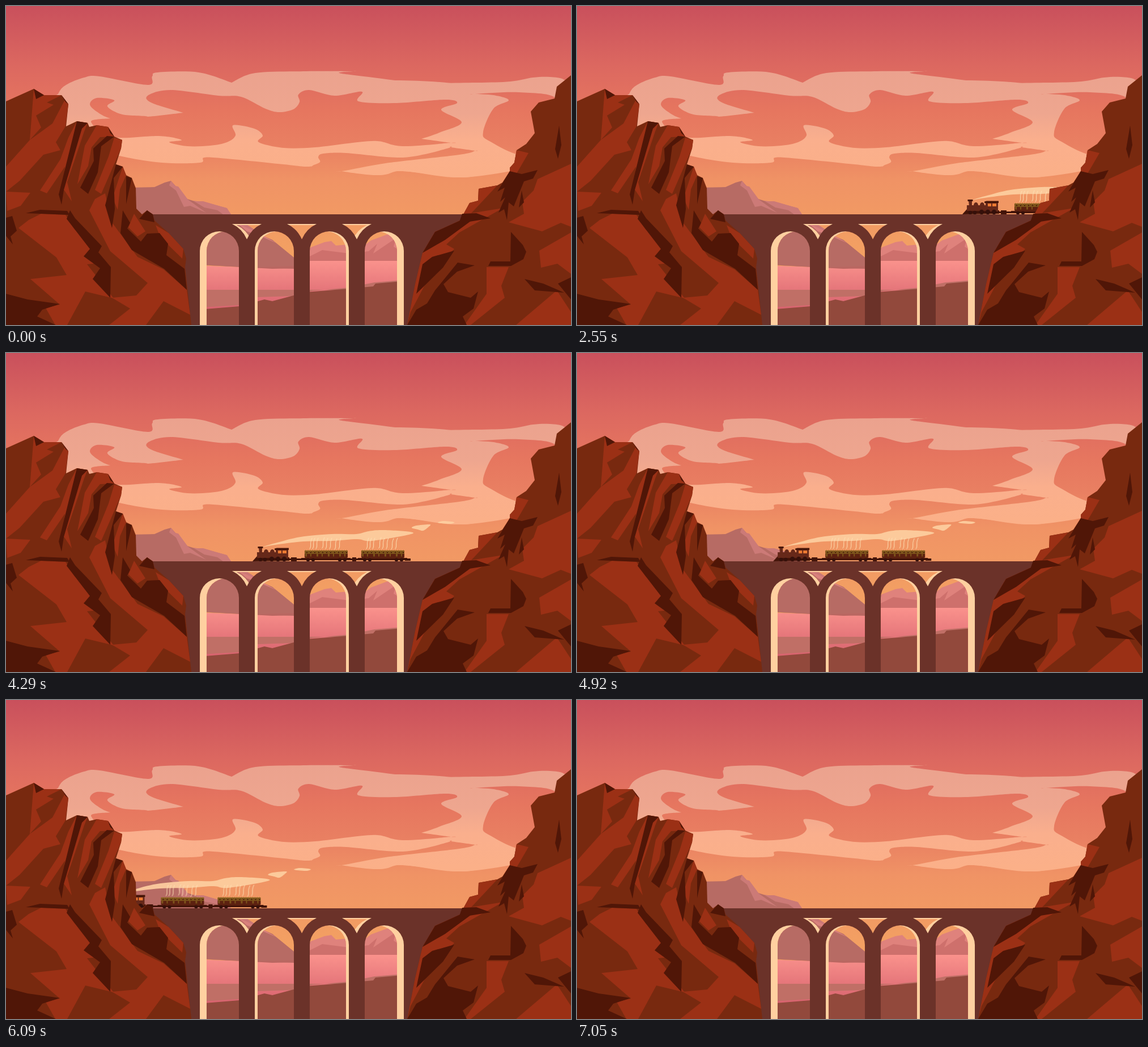
An HTML page for the animation above (7.08 s loop, 997 by 562 pixels).

```html
<!DOCTYPE html>
<html lang="en">
<head>
<meta charset="utf-8">
<title>Train over the viaduct</title>
<style>
html, body { margin: 0; width: 100%; height: 100%; overflow: hidden; background: #e6795f; }
svg { display: block; width: 100%; height: 100%; }
.base { fill: #78290f; }
.light { fill: #9b3015; }
.dark { fill: #501607; }
.cloud { fill: url(#haze); }
.sky { fill: url(#dusk); }
.bridge { fill: #6b3229; }
.wheels { fill: none; stroke: #35100a; stroke-linecap: round; }
#wisp { fill: none; stroke: #fde0b4; stroke-linecap: round; }
#train {
  animation: ride 7.08s steps(236) infinite, show 7.08s step-end infinite;
}
@keyframes ride {
  from { transform: translateX(604px); }
  to { transform: translateX(-393px); }
}
/* on the rails from 1590 ms to 7050 ms */
@keyframes show {
  0% { visibility: hidden; }
  22.458% { visibility: visible; }
  99.576% { visibility: hidden; }
}
</style>
</head>
<body>
<svg viewBox="0 0 997 562" preserveAspectRatio="none">
<defs>
  <linearGradient id="dusk" gradientUnits="userSpaceOnUse" x1="0" y1="0" x2="0" y2="440">
    <stop offset="0" stop-color="#c9505c"/>
    <stop offset=".24" stop-color="#dc6860"/>
    <stop offset=".42" stop-color="#e6765f"/>
    <stop offset=".56" stop-color="#e98062"/>
    <stop offset=".7" stop-color="#f09365"/>
    <stop offset="1" stop-color="#f3a162"/>
  </linearGradient>
  <linearGradient id="haze" gradientUnits="userSpaceOnUse" x1="0" y1="115" x2="0" y2="300">
    <stop offset="0" stop-color="#eba28e"/>
    <stop offset=".4" stop-color="#eea68f"/>
    <stop offset=".65" stop-color="#faaf8d"/>
    <stop offset="1" stop-color="#fbb088"/>
  </linearGradient>
  <linearGradient id="water" gradientUnits="userSpaceOnUse" x1="0" y1="449" x2="0" y2="532">
    <stop offset="0" stop-color="#fa928c"/>
    <stop offset="1" stop-color="#d8646f"/>
  </linearGradient>
  <path id="arch" d="M342 570V431.5a34.5 34.5 0 0 1 69 0V570z"/>
  <path id="gap" d="M399 384H451A52.6 52.6 0 0 0 425 411A52.6 52.6 0 0 0 399 384z"/>
  <!-- what can be seen past the lit inner faces of the openings -->
  <clipPath id="view">
    <path d="M0 0H997V370H0z"/>
    <use href="#arch" x="12"/><use href="#arch" x="102"/>
    <use href="#arch" x="189"/><use href="#arch" x="279"/>
    <use href="#gap" x="8" y="2"/><use href="#gap" x="97" y="2"/><use href="#gap" x="186" y="2"/>
  </clipPath>
  <mask id="holes">
    <path fill="#fff" d="M0 0H997V562H0z"/>
    <use href="#arch"/><use href="#arch" x="97"/>
    <use href="#arch" x="194"/><use href="#arch" x="291"/>
    <use href="#gap"/><use href="#gap" x="97"/><use href="#gap" x="194"/>
  </mask>
  <path id="wisp" d="M536 345c4-6-1-9 4-19"/>
  <g id="car">
    <path fill="#431409" d="M521 361H608V365H521z"/>
    <path fill="#5c2110" d="M527 349H603V360L600 362H530L527 360z"/>
    <path fill="#7d531b" d="M527 348H603V354H527z"/>
    <path fill="none" stroke="#7d531b" stroke-width="5" stroke-dasharray="3 6 2 9" d="M528 356H602"/>
    <path fill="none" stroke="#99722a" stroke-width="2" stroke-dasharray="2" d="M528 348.3H603"/>
    <path fill="none" stroke="#3a1208" stroke-width="1.4" stroke-dasharray="2 5" d="M530 351.5H602"/>
    <path class="wheels" stroke-width="6" stroke-dasharray="0 9" d="M533 364.5h9.1M589 364.5h9.1"/>
    <use href="#wisp"/><use href="#wisp" x="5"/><use href="#wisp" x="11"/>
    <use href="#wisp" x="22" y="-1"/><use href="#wisp" x="28"/><use href="#wisp" x="35"/>
    <use href="#wisp" x="44" y="1"/><use href="#wisp" x="51"/>
  </g>
</defs>

<path fill="#ffd0a0" d="M330 376H715V562H330z"/>
<g clip-path="url(#view)">
  <path class="sky" d="M0 0H997V562H0z"/>
  <path class="cloud" data-curve="80,190 92,155 106,139 138,126 165,124 250,139 258,124 268,117 340,117 398,135 398,135 440,118 530,115 613,115 613,115 588,118 640,125 730,135 830,135 890,133 930,126 960,125 985,130 1000,150 970,270 890,291 795,302 700,291 592,291"/>
  <path class="cloud" data-curve="592,291 670,277 800,262 828,255 828,255 785,249 785,249 740,261 690,267 600,259 560,260 554,275 535,283 490,279 390,269 350,267 342,276 275,276 200,264 120,240 92,155 300,140 600,130 840,150 840,262 840,294 795,302 700,291 592,291"/>
  <path class="sky" data-curve="592,291 670,277 800,262 828,255 828,255 785,249 785,249 740,261 690,267 600,259 560,260 551,266 554,275 540,283 560,291"/>
  <path class="sky" data-curve="535,148 580,158 628,151 622,168 685,171 775,165 796,171 768,183 804,205 765,223 733,234 733,234 785,241 785,241 700,247 655,238 604,242 545,249 490,250 446,240 453,228 438,216 401,210 405,228 390,240 360,246 320,247 288,240 310,236 270,229 190,231 150,204 184,198 184,198 250,195 313,188 313,188 258,171 250,158 290,148 375,158 415,160 458,181 482,187 507,182 518,169 516,156"/>
  <path class="sky" data-curve="191,166 179,177 205,191 250,195 230,205 184,198 160,186 148,173 160,162"/>
  <path class="sky" data-curve="970,163 905,152 826,155 826,155 860,157 887,166 860,181 842,222 853,238 915,262 940,210"/>
  <!-- far hills -->
  <path fill="#cc7876" d="M322 344L348 344L389 356L397 367L445 398L440 420L330 410z"/>
  <path fill="#b76b64" d="M215 320L262 319L280 311L291 308L320 340L365 354L410 386L470 412L508 443V464L340 456L215 400z"/>
  <path fill="#cc7a77" d="M291 308L299 317L304 318L321 341L353 364L325 352L314 354L300 325L288 316zM330 343L352 346L390 356L397 367H383L374 360L350 355z"/>
  <path fill="#d9807c" d="M410 384L446 400L478 418L450 406L425 397z"/>
  <path fill="#df827c" d="M530 436L538 425L562 416L574 414L582 422L606 420L622 430L644 413L682 399L710 420V452H530z"/>
  <path fill="#ce706c" d="M530 444L558 430L606 436L640 432L655 419L648 436L688 409L684 424L710 440V452H530z"/>
  <path fill="url(#water)" d="M330 457L508 463L530 449H710V540H330z"/>
  <path fill="#b96761" d="M340 456L440 460L508 458V462L470 463z"/>
  <path fill="#c06f66" d="M340 531L412 527L444 513L508 511L540 502L605 496L650 487L710 482V500H340z"/>
  <path fill="#92493c" d="M340 535L412 529L456 517L470 520L530 504L605 498L648 494L652 489L710 484V562H340z"/>
</g>
<path class="bridge" mask="url(#holes)" d="M230 367H830V562H230z"/>

<g id="train">
  <g fill="#fdcfa0" opacity=".92">
    <path data-curve="451,342 475,335 520,324 575,319 618,319 640,314 665,312 713,315 711,320 645,331 620,328 575,331 525,332 475,338 457,341"/>
    <path data-curve="716,308 724,304 748,302 745,307 736,313 727,311"/>
    <path data-curve="762,299 772,296 791,298 783,301"/>
  </g>
  <path fill="#431409" d="M435 367L443 358L500 360V366zM498 362H530V365H498zM503 360H513V367H503zM604 362H628V365H604zM611 360H618V367H611zM704 362H714V366H704z"/>
  <path fill="#662819" d="M443 351H476V361H443zM446 343H452V352H447zM455 351a4 5 0 0 1 8 0zM466 351a4 5 0 0 1 8 0zM476 346H498V362H476z"/>
  <path fill="#461508" d="M444.5 341H453.5V344H444.500zM474 344.500L478 343.500H499V347H474z"/>
  <path fill="#ec7a32" d="M480 348H486V353H480zM488 348H495V353H488z"/>
  <path class="wheels" stroke-width="6.400" stroke-dasharray="0 8" d="M449 364h8.100"/>
  <path class="wheels" stroke-width="8.400" stroke-dasharray="0 11" d="M469 363h22.100"/>
  <use href="#car"/><use href="#car" x="100"/>
</g>
<path class="bridge" d="M240 367H825V372H240z"/>

<g id="west">
  <path class="base" d="M0 168L49 146L67 157L98 157L110 173L106 212L125 203L144 206L147 213L160 210L180 213L191 230L205 236L203 251L194 279L206 283L212 298L222 303L229 321L230 357L240 367L249 360L259 367L262 378L287 400L313 428L318 445L316 460L327 562H0z"/>
  <path class="light" d="M49 146L67 157L98 157L72 170L84 174L53 193L62 214L42 236L82 207L104 165L110 173L105 212L88 240L96 254L66 262L24 308L0 327V283L42 236z"/>
  <path class="light" d="M125 203L110 232L96 270L60 325L72 330L104 283L101 322L116 344L108 310L138 221L144 206z"/>
  <path class="light" d="M160 210L180 213L191 230L166 231L151 249L145 282L126 314L139 246zM191 232L205 236L203 251L168 331L157 324L181 265zM206 283L212 298L201 323L197 359L188 338z"/>
  <path class="light" d="M0 327L43 329L26 352L2 361zM62 366L105 368L120 392L174 452L143 455L190 515L140 503L108 562H87L70 532L95 526L43 481L107 474L89 443L22 391L40 377z"/>
  <path class="light" d="M175 330L186 380L232 442L278 464L319 500L325 544L278 520L247 562H182L219 533L187 514L230 510L250 488L184 432L147 360L157 340z"/>
  <path class="light" d="M226 366L246 397L232 406L216 390zM264 386L287 400L313 428L311 445L272 407z"/>
  <path class="dark" d="M49 146L67 157L53 164zM98 157L110 173L105 169zM125 203L144 206L134 216L102 324L98 350L93 332zM180 213L191 230L184 224z"/>
  <path class="dark" d="M178 229L191 230L168 247L162 293L145 331L131 320L155 273L154 251zM194 279L206 283L190 303L192 358L187 391L175 351z"/>
  <path class="dark" d="M0 373L11 370L19 396L8 406L12 420L0 405zM35 365L60 359L108 361L112 368zM113 360L122 374L169 423L163 434L185 460L184 514L153 481L166 462L137 441L148 428L107 375z"/>
  <path class="dark" d="M206 360L219 382L214 392L238 415L249 401L271 400L286 419L283 439L315 463L319 500L279 463L222 430L202 400z"/>
  <path class="dark" d="M249 360L259 367L262 381L235 375zM0 507L38 517L95 525L64 535L55 547L88 562H0zM212 300L222 303L212 349z"/>
</g>

<g id="east">
  <path class="base" d="M997 122L972 142L968 163L940 170L926 186L933 224L918 243L901 254L897 276L889 285L889 291L876 311L867 316L834 322L833 343L818 347L801 378L757 398L735 435L722 490L708 562H997z"/>
  <path class="light" d="M834 322L867 316L821 365L877 356L800 399L777 420L791 428L752 467L714 539L708 562L722 490L735 435L757 398L801 378L818 347L833 343z"/>
  <path class="light" d="M997 278L938 305L931 325L911 345L914 366L887 381L946 397L979 382L997 389zM901 254L922 259L873 343L889 309L889 285L897 276z"/>
  <path class="light" d="M848 460H887L874 493L880 514L820 562H809L848 507zM997 399L941 431L944 461L973 454L997 472zM900 562L972 501L997 539V562z"/>
  <path class="dark" d="M976 211L980 245L974 269L969 252zM889 291L910 296L938 289L930 304L914 309L896 353L887 346L884 377L879 358L869 364L881 337L872 345L880 320L867 327z"/>
  <path class="dark" d="M910 325L914 346L905 355zM891 398L912 421L918 433L913 446L891 458H851L855 450H890zM757 398L801 378L820 379L775 412L735 435z"/>
  <path class="dark" d="M735 455L752 442L791 431L771 461L724 507zM797 452L827 457L796 468L772 490L780 504L820 514L833 503L825 533L806 547L813 562H708L724 535L743 524L757 501z"/>
  <path class="dark" d="M805 366L830 365L855 374L799 383zM915 481L948 489L985 505L933 501zM997 478L974 489L997 517z"/>
</g>
</svg>
<script>
// Smooth closed curve through the listed points; a doubled point makes a tip.
function smooth(text) {
  const pts = text.split(" ").map(pair => pair.split(",").map(Number));
  const at = i => pts[(i + pts.length) % pts.length];
  let d = "M" + pts[0];
  pts.forEach((p, i) => {
    const [before, next, after] = [at(i - 1), at(i + 1), at(i + 2)];
    const a = p.map((v, k) => v + (next[k] - before[k]) / 6);
    const b = next.map((v, k) => v - (after[k] - p[k]) / 6);
    d += `C${a} ${b} ${next}`;
  });
  return d + "z";
}
for (const path of document.querySelectorAll("[data-curve]"))
  path.setAttribute("d", smooth(path.dataset.curve));
</script>
</body>
</html>
```
